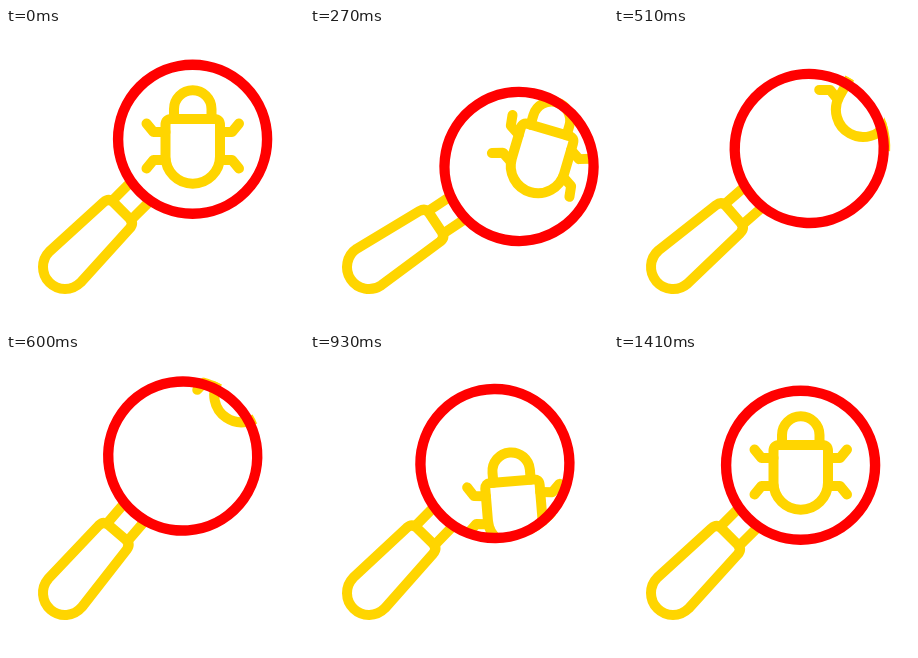
Write an HTML page that moves like this. It is 298x298 px and loops after 1500 ms.

```html
<!DOCTYPE html>
<html lang="en">
<head>
<meta charset="utf-8">
<title>Bug search</title>
<style>
  html, body { margin: 0; width: 100%; height: 100%; overflow: hidden; background: #fff; }
  svg { display: block; width: 100vw; height: 100vh; }
  .line { fill: none; stroke: #ffd500; stroke-width: 10; stroke-linecap: round; stroke-linejoin: round; }
</style>
</head>
<body>
<svg viewBox="0 0 298 298">
  <defs>
    <clipPath id="view"><circle cx="187.6" cy="110.2" r="80"/></clipPath>
  </defs>
  <g id="glass">
    <g class="line" transform="translate(59 239) rotate(-45)">
      <path d="M0 -22 L73 -18.5 Q80 -18 80 -11 V11 Q80 18 73 18.5 L0 22 A22 22 0 0 1 0 -22 Z"/>
      <path d="M82 -13.5 H107 M82 13.5 H107"/>
    </g>
    <g clip-path="url(#view)">
      <g id="bug" class="line">
        <path d="M168 91 V81 a18.75 18.75 0 0 1 37.5 0 V91"/>
        <path d="M165.5 91 H208 q6 0 6 6 V128.5 a27.25 27.25 0 0 1 -54.5 0 V97 q0 -6 6 -6 Z"/>
      </g>
    </g>
    <circle cx="186.6" cy="111.2" r="74.5" fill="none" stroke="#f00" stroke-width="10.4"/>
  </g>
</svg>
<script>
const LOOP = 1500, STEP = 30, LAST = 1410;
const glass = document.getElementById('glass');
const bug = document.getElementById('bug');

// x, y of the joint with the body, then the side and vertical direction
const legs = [
  [159.5, 104, -1, -1], [214, 104, 1, -1],
  [159.5, 132, -1, 1], [214, 132, 1, 1]
].map(([x, y, side, dir]) => {
  const el = document.createElementNS('http://www.w3.org/2000/svg', 'path');
  el.setAttribute('d', `M${x} ${y} h${12 * side} l${7 * side} ${8.5 * dir}`);
  bug.append(el);
  return { el, x, y };
});

const ease = u => {
  u = Math.min(1, Math.max(0, u));
  return u * u * (3 - 2 * u);
};

// time, degrees
const swing = [[0, 0], [360, 13.3], [690, -8.2], [985, 0], [LOOP, 0]];

function swingAt(t) {
  const i = swing.findIndex(k => k[0] > t);
  const [t0, a] = swing[i - 1], [t1, b] = swing[i];
  return a + (b - a) * ease((t - t0) / (t1 - t0));
}

// the bug leaves at the upper right and returns from below
function bugAt(t) {
  if (t < 720) {
    const u = t / 900, p = ease(u);
    return [85 * p, -99.5 * p, 105 * u ** 2.5];
  }
  const p = 1 - ease((t - 690) / 390);
  return [58.5 * p, 115 * p, -12 * p];
}

function legAngle(t) {
  const lag = 34 * Math.sin(Math.PI * t / LAST);
  return 32 * Math.sin(14 * Math.PI * (t - lag) / LAST);
}

function draw(now) {
  const t = Math.min(LAST, Math.floor((now % LOOP) / STEP) * STEP);
  const [x, y, turn] = bugAt(t);
  const wiggle = legAngle(t);
  glass.setAttribute('transform', `rotate(${swingAt(t)} 59 239)`);
  bug.setAttribute('transform', `translate(${x} ${y}) rotate(${turn} 186.75 128.5)`);
  for (const leg of legs) {
    leg.el.setAttribute('transform', `rotate(${wiggle} ${leg.x} ${leg.y})`);
  }
}

const start = performance.now();
function tick() {
  draw(performance.now() - start);
  requestAnimationFrame(tick);
}
tick();
</script>
</body>
</html>
```
